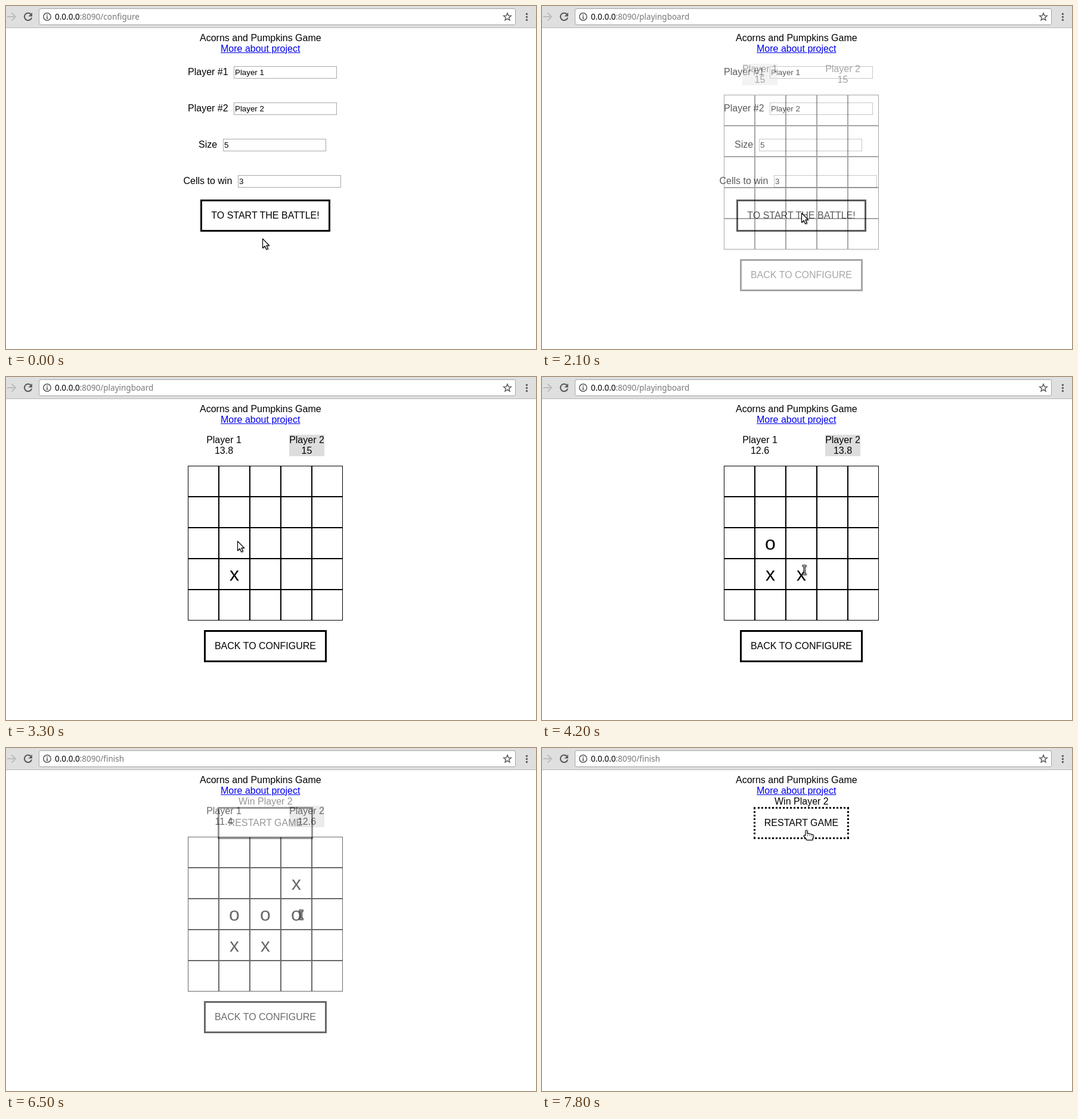
These frames come from a looping animation (889 by 576 pixels, 8 s). An HTML page:

```html
<!DOCTYPE html>
<html lang="en">
<meta charset="utf-8">
<title>Board game</title>
<style>
html, body { margin: 0; width: 100%; height: 100%; overflow: hidden; background: #fff }
body { font: 16px/18px "Liberation Sans", Arial, sans-serif; color: #000 }
body * { position: absolute; box-sizing: border-box; white-space: pre }
span { position: static !important }
#bar { left: 0; top: 0; width: 889px; height: 37px; background: #dfdfdf; border-bottom: 1px solid #b5b5b5 }
#url { left: 55px; top: 4px; width: 800px; height: 28px; background: #fff; border: 1px solid #a5a5a5; border-radius: 3px }
#address { left: 82px; top: 9px; font: 13.5px/18px "Noto Sans", "Open Sans", sans-serif; color: #777 }
#address span:first-child { color: #000 }
svg { left: 0; top: 0; overflow: visible }
.link { color: #00e; text-decoration: underline }
.input { width: 173px; height: 21px; border: 1px solid #a9a9a9; font-size: 13.333px; line-height: 19px; padding-left: 1px }
.button { height: 54px; border: 3px solid #000; padding: 15px 0; text-align: center }
.button.hover { border-style: dotted }
.player { top: 97px; width: 59px; height: 36px; text-align: center }
.player.active { background: #ddd }
.cell { width: 52px; height: 52px; border: 1px solid #000; font-size: 32px; line-height: 50px; text-align: center }
</style>
<body>
<div id="bar"></div>
<div id="url"></div>
<svg width="889" height="37" fill="none" stroke="#5a5a5a">
  <path d="M2 18H15M9.500 11.500L16 18L9.500 24.500" stroke="#bcbcbc" stroke-width="2"/>
  <path d="M41.500 13.500A6.200 6.200 0 1 0 43.100 19.500" stroke-width="2"/>
  <path d="M44 11V17.500H37.500z" fill="#5a5a5a" stroke="none"/>
  <circle cx="69" cy="18" r="6.200" stroke-width="1.500"/>
  <path d="M69 14.200V16M69 17V22" stroke-width="1.700"/>
  <path id="star" stroke-width="1.500"/>
  <path d="M873.500 13.500h0M873.500 18.500h0M873.500 23.500h0" stroke-width="3.400" stroke-linecap="round"/>
</svg>
<div id="address"><span>0.0.0.0</span><span id="path"></span></div>
<div id="form"></div>
<div id="board"></div>
<div id="finish"></div>
<svg id="cursor" width="20" height="22" stroke="#000" stroke-linejoin="round" style="filter:drop-shadow(1px 1px 1px #0005)">
  <path id="arrow" d="M.5 .8V16.500L4.200 13.200L6.700 18.800L9.300 17.600L6.900 12.200H11.500z" fill="#fff" stroke-width="1.200"/>
  <g id="hand">
    <path d="M-1 9V1.500Q-1 0 .5 0T2 1.500V6Q5 5 6 6.500Q9 6 9.500 7.500Q12 7 12 9V12Q11 14 10.500 16.500H1Q0 14-4 10Q-4 7.500-1 9z" fill="#fff" stroke-width="1.200"/>
    <path d="M2.500 8v2M6 8v2M9 9v1.500" stroke-width=".8"/>
  </g>
  <g id="beam" fill="none">
    <path d="M-3.500-7H3.500M0-7V7M-3.500 7H3.500" stroke-width="3"/>
    <path d="M-3-7H3M0-7V7M-3 7H3" stroke="#fff"/>
  </g>
</svg>
<script>
const $ = id => document.getElementById(id);
const LOOP = 8000, STEP = 100, FADE = 1000;
const FORM_OUT = 1700, BOARD_OUT = 6060;

function add(parent, left, top, text, cls = '', width) {
  const el = document.createElement('div');
  el.className = cls;
  el.textContent = text;
  el.style.cssText = `left:${left}px;top:${top}px;` + (width ? `width:${width}px` : '');
  parent.append(el);
  return el;
}

add(document.body, 325, 45, 'Acorns and Pumpkins Game');
add(document.body, 360, 63, 'More about project', 'link');

[['Player #1', 305, 382, 'Player 1'], ['Player #2', 305, 382, 'Player 2'],
 ['Size', 323, 364, '5'], ['Cells to win', 297.5, 389, '3']].forEach(([label, x, inputX, value], i) => {
  add($('form'), x, 102 + 61 * i, label);
  add($('form'), inputX, 101 + 61 * i, value, 'input');
});
const startButton = add($('form'), 326, 325, 'TO START THE BATTLE!', 'button', 218);

const players = [336, 475].map(x => add($('board'), x, 97, '', 'player'));
const cells = Array.from({ length: 25 }, (_, i) =>
  add($('board'), 305 + i % 5 * 52, 149 + Math.floor(i / 5) * 52, '', 'cell'));
add($('board'), 332, 425, 'BACK TO CONFIGURE', 'button', 206);

add($('finish'), 390, 81, 'Win Player 2');
const restartButton = add($('finish'), 355, 99, 'RESTART GAME', 'button', 160);

$('star').setAttribute('d', 'M' + Array.from({ length: 10 }, (_, i) => {
  const a = i * Math.PI / 5, r = i % 2 ? 2.9 : 6.6;
  return [841 + r * Math.sin(a), 18.5 - r * Math.cos(a)];
}).join('L') + 'z');

// time, column, row
const moves = [[3000, 1, 3], [3500, 1, 2], [4200, 2, 3], [4700, 2, 2], [5400, 3, 1], [6100, 3, 2]];

// time, x, y
const track = [[500, 430, 390], [900, 435, 347], [2500, 435, 347], [2800, 388, 330], [3000, 388, 330],
  [3300, 388, 275], [3500, 388, 275], [4000, 440, 328], [4100, 440, 328], [4200, 440, 324],
  [4400, 440, 274], [4700, 440, 274], [5100, 491, 226], [5400, 491, 226], [5800, 495, 279],
  [7200, 495, 280], [7800, 443, 138]];

const smooth = p => { p = Math.min(1, Math.max(0, p)); return p * p * (3 - 2 * p); };

function pointer(t) {
  const i = track.findIndex(k => k[0] > t);
  if (i < 0) return track[track.length - 1].slice(1);
  if (!i) return track[0].slice(1);
  const [a, b] = [track[i - 1], track[i]], p = smooth((t - a[0]) / (b[0] - a[0]));
  return [1, 2].map(n => Math.round(a[n] + (b[n] - a[n]) * p));
}

function show(id, opacity) {
  $(id).style.opacity = opacity;
  $(id).style.display = opacity ? '' : 'none';
}

function draw(t) {
  const entered = smooth((t - FORM_OUT) / FADE), ended = smooth((t - BOARD_OUT) / FADE);
  show('form', 1 - entered);
  show('board', entered * (1 - ended));
  show('finish', ended);
  $('path').textContent = ':8090/' + (t < 1700 ? 'configure' : t < 6100 ? 'playingboard' : 'finish');

  const [x, y] = pointer(t);
  const played = moves.filter(m => t >= m[0]);
  cells.forEach(c => c.textContent = '');
  played.forEach(([, col, row], i) => cells[row * 5 + col].textContent = 'xo'[i % 2]);

  // the winning move no longer updates the clocks
  const turns = Math.min(played.length, 5);
  players.forEach((el, i) => {
    const used = Math.floor((turns + 1 - i) / 2);
    el.textContent = `Player ${i + 1}\n${+(15 - 1.2 * used).toFixed(1)}`;
    el.classList.toggle('active', turns % 2 === i);
  });

  const onStart = t <= FORM_OUT && y < 379, onRestart = ended === 1 && y < 153;
  startButton.classList.toggle('hover', onStart);
  restartButton.classList.toggle('hover', onRestart);
  const onMark = ended < 1 && played.some(([, col, row]) =>
    Math.abs(x - 331 - col * 52) < 10 && Math.abs(y - 175 - row * 52) < 18);
  const shape = onStart || onRestart ? 'hand' : onMark ? 'beam' : 'arrow';
  for (const id of ['arrow', 'hand', 'beam']) $(id).style.display = id === shape ? '' : 'none';
  $('cursor').style.transform = `translate(${x}px,${y}px)`;
}

const begin = performance.now();
function frame() {
  const t = (performance.now() - begin) % LOOP;
  draw(Math.floor(t / STEP) * STEP);
  requestAnimationFrame(frame);
}
frame();
</script>
</body>
</html>
```
